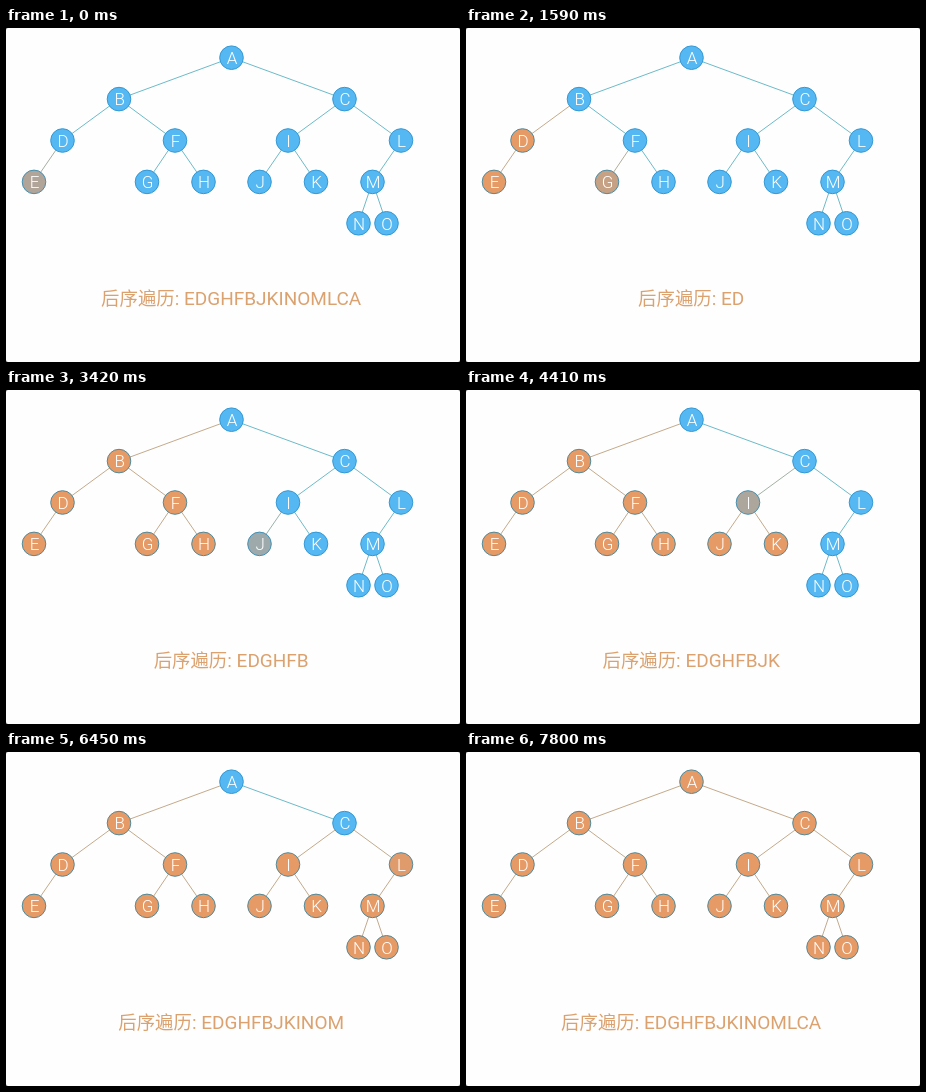
Write an HTML page that moves like this. It is 454 px wide and 334 px high and loops after 7.95 s.

```html
<!DOCTYPE html>
<html lang="zh">
<head>
<meta charset="utf-8">
<style>
  html, body { margin: 0; width: 100%; height: 100%; overflow: hidden; background: #444; }
  svg { display: block; width: 454px; height: 334px; background: #fefefe; border-radius: 2px; }
  text { font-family: Roboto, "Noto Sans CJK SC", "Noto Sans CJK", sans-serif; text-anchor: middle; }
  .letter { font-size: 17px; font-weight: 300; fill: #fff; }
  #caption { font-size: 19px; fill: #dba26f; white-space: pre; }
  #title { font-size: 18.4px; }
</style>
</head>
<body>
<svg id="stage" viewBox="0 0 454 334"><text id="caption" x="225.2" y="277.4"><tspan id="title">后序遍历</tspan><tspan id="result"></tspan></text></svg>
<script>
const LOOP = 7950;
const ORDER = 'EDGHFBJKINOMLCA';

// name: [x, depth, parent]
const TREE = {
  A: [225.5, 0], B: [113, 1, 'A'], C: [338.5, 1, 'A'],
  D: [56.5, 2, 'B'], F: [169, 2, 'B'], I: [282, 2, 'C'], L: [395, 2, 'C'],
  E: [28, 3, 'D'], G: [141, 3, 'F'], H: [197.5, 3, 'F'],
  J: [253.5, 3, 'I'], K: [310, 3, 'I'], M: [366.5, 3, 'L'],
  N: [352.5, 4, 'M'], O: [380.5, 4, 'M']
};

// [time in ms, nodes visited so far]
const PACE = [[510, .63], [1590, 2.78], [3420, 6.5], [4410, 8.6],
              [5670, 11.12], [6450, 12.95], [7560, 15]];

const FILL = [[86, 184, 242], [230, 154, 101]];
const RIM = [[52, 152, 212], [80, 138, 156]];
const LINE = [[108, 187, 202], [197, 170, 138]];

const stage = document.getElementById('stage');
const result = document.getElementById('result');
const rowY = depth => 29.7 + depth * 41.4;
const mix = ([a, b], p) => `rgb(${a.map((v, i) => Math.round(v + (b[i] - v) * p))})`;

function add(tag, attrs) {
  const el = document.createElementNS('http://www.w3.org/2000/svg', tag);
  for (const key in attrs) el.setAttribute(key, attrs[key]);
  return stage.appendChild(el);
}

const edges = {}, discs = {};
for (const name in TREE) {
  const [x, depth, parent] = TREE[name];
  if (!parent) continue;
  const [px, pd] = TREE[parent];
  edges[name] = add('line', { x1: px, y1: rowY(pd), x2: x, y2: rowY(depth) });
}
for (const name in TREE) {
  const [x, depth] = TREE[name], y = rowY(depth);
  discs[name] = add('circle', { cx: x, cy: y, r: 11.8 });
  add('text', { class: 'letter', x: x + .6, y: y + 6.2 }).textContent = name;
}

function visited(t) {
  if (t <= PACE[0][0]) return PACE[0][1];
  for (let i = 1; i < PACE.length; i++) {
    const [t0, v0] = PACE[i - 1], [t1, v1] = PACE[i];
    if (t < t1) return v0 + (v1 - v0) * (t - t0) / (t1 - t0);
  }
  return ORDER.length;
}

function draw(t) {
  const v = visited(t);
  [...ORDER].forEach((name, i) => {
    const p = Math.min(1, Math.max(0, v - i));
    discs[name].setAttribute('fill', mix(FILL, p));
    discs[name].setAttribute('stroke', mix(RIM, p));
    if (edges[name]) edges[name].setAttribute('stroke', mix(LINE, p));
  });
  // the finished caption stays until the first node is done
  const label = ': ' + ORDER.slice(0, Math.floor(v) || ORDER.length);
  if (result.textContent !== label) result.textContent = label;
}

const start = performance.now();
function tick() {
  draw((performance.now() - start) % LOOP);
  requestAnimationFrame(tick);
}
tick();
</script>
</body>
</html>
```
